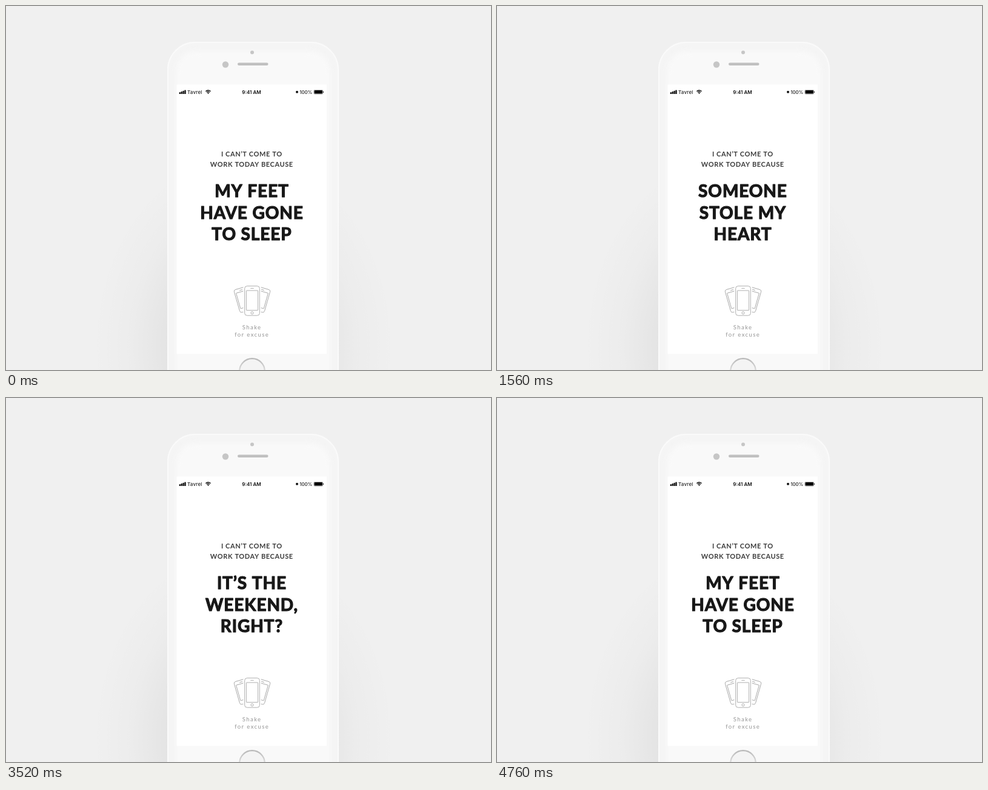
These frames come from a looping animation (800 px wide and 600 px high, 4.92 s). An HTML page with a canvas:

```html
<!DOCTYPE html>
<html lang="en">
<head>
<meta charset="utf-8">
<title>Shake for excuse</title>
<style>
  html, body { margin: 0; width: 100%; height: 100%; overflow: hidden; background: #f0f0f0; }
  canvas { display: block; width: 800px; height: 600px; }
</style>
</head>
<body>
<canvas id="stage" width="800" height="600"></canvas>
<script>
const ctx = document.getElementById('stage').getContext('2d');

const LOOP = 4920, STEP = 40;
const PIVOT = { x: 405, y: 352 };
const SHAKES = [680, 2255, 3862];
const SWING = 4.9, HALF = 280, SETTLE = 310;
const EXCUSES = [
  ['MY FEET', 'HAVE GONE', 'TO SLEEP'],
  ['SOMEONE', 'STOLE MY', 'HEART'],
  ['IT’S THE', 'WEEKEND,', 'RIGHT?']
];
const LATO = 'Lato, "Open Sans", sans-serif';
const INTER = 'Inter, Roboto, sans-serif';

const ease = u => (1 - Math.cos(Math.PI * u)) / 2;

// Right, left, then back to rest
function swing(t) {
  if (t <= 0 || t >= 2 * HALF + SETTLE) return 0;
  if (t < HALF) return SWING * ease(t / HALF);
  if (t < 2 * HALF) return SWING * (1 - 2 * ease(t / HALF - 1));
  return -SWING * (1 - ease((t - 2 * HALF) / SETTLE));
}

function roundRect(x, y, w, h, r) {
  ctx.beginPath();
  ctx.roundRect(x, y, w, h, r);
}

function disc(x, y, r, fill) {
  ctx.beginPath();
  ctx.arc(x, y, r, 0, Math.PI * 2);
  ctx.fillStyle = fill;
  ctx.fill();
}

function text(str, x, y, font, fill, gap = 0, align = 'center') {
  ctx.font = font;
  ctx.letterSpacing = gap + 'px';
  ctx.textAlign = align;
  ctx.fillStyle = fill;
  ctx.fillText(str, align === 'center' ? x + gap / 2 : x, y);
}

function drawShadow() {
  ctx.save();
  ctx.translate(392, 560);
  ctx.scale(250, 320);
  const g = ctx.createRadialGradient(0, 0, 0, 0, 0, 1);
  g.addColorStop(0, 'rgba(0,0,0,.11)');
  g.addColorStop(0.5, 'rgba(0,0,0,.05)');
  g.addColorStop(0.75, 'rgba(0,0,0,.015)');
  g.addColorStop(1, 'rgba(0,0,0,0)');
  disc(0, 0, 1, g);
  ctx.restore();
}

function drawBody() {
  roundRect(266, 59, 283, 620, 46);
  ctx.fillStyle = '#f5f5f5';
  ctx.fill();

  ctx.save();
  ctx.clip();
  ctx.filter = 'blur(5px)';
  roundRect(280, 74, 255, 620, 34);
  ctx.fillStyle = '#f9f9f9';
  ctx.fill();
  ctx.restore();

  roundRect(267, 60, 281, 618, 45);
  ctx.strokeStyle = '#fafafa';
  ctx.lineWidth = 2;
  ctx.stroke();

  disc(406, 76.5, 3, '#c6c6c6');
  disc(362, 96.5, 5.2, '#c6c6c6');
  roundRect(382, 93.5, 50.5, 4.4, 2.2);
  ctx.fillStyle = '#c0c0c0';
  ctx.fill();

  ctx.fillStyle = '#fff';
  ctx.fillRect(281.5, 129.5, 247.5, 444);

  disc(406, 602, 20.8, '#f4f4f4');
  const ring = ctx.createLinearGradient(0, 581, 0, 623);
  ring.addColorStop(0, '#b8b8b8');
  ring.addColorStop(0.5, '#dcdcdc');
  ring.addColorStop(1, '#f0f0f0');
  ctx.strokeStyle = ring;
  ctx.lineWidth = 2.2;
  ctx.stroke();
}

function drawStatus() {
  const ink = '#111';
  ctx.fillStyle = ink;
  for (let i = 0; i < 4; i++) {
    const h = 2.8 + i * 1.2;
    ctx.fillRect(285.7 + i * 2.9, 145 - h, 2.3, h);
  }
  text('Tavrel', 299, 144.7, '500 8px ' + INTER, '#222', 0.2, 'left');

  ctx.strokeStyle = ink;
  ctx.lineWidth = 1.4;
  for (const r of [3.2, 5.6]) {
    ctx.beginPath();
    ctx.arc(333.5, 144.6, r, -Math.PI * 0.76, -Math.PI * 0.24);
    ctx.stroke();
  }
  disc(333.5, 143.8, 1.1, ink);

  text('9:41 AM', 405, 144.7, '600 8px ' + INTER, ink);
  disc(480, 141.8, 2, ink);
  text('100%', 505.2, 144.7, '500 7.8px ' + INTER, '#222', 0, 'right');

  roundRect(507.8, 138.4, 14.8, 6.8, 1.5);
  ctx.strokeStyle = '#777';
  ctx.lineWidth = 0.6;
  ctx.stroke();
  roundRect(508.5, 139.1, 13.4, 5.4, 0.8);
  ctx.fillStyle = '#000';
  ctx.fill();
  ctx.fillRect(523.1, 140.7, 0.9, 2.2);
}

function sidePhone(dir) {
  ctx.save();
  ctx.translate(406 + dir * 13.5, 483.7);
  ctx.rotate(dir * 16 * Math.PI / 180);
  roundRect(-12, -19.5, 24, 39, 3.5);
  ctx.stroke();
  roundRect(-9.6, -13.5, 19.2, 26.5, 0.5);
  ctx.stroke();
  ctx.beginPath();
  ctx.moveTo(-3, -16.3);
  ctx.lineTo(2, -16.3);
  ctx.stroke();
  ctx.restore();
}

function drawIcon() {
  ctx.strokeStyle = '#a6a6a6';
  ctx.lineWidth = 0.9;
  sidePhone(-1);
  sidePhone(1);

  ctx.fillStyle = '#fff';
  roundRect(391.3, 459, 29.4, 54, 5);
  ctx.fill();

  roundRect(393.7, 461.6, 24.6, 48.6, 4);
  ctx.stroke();
  roundRect(396.4, 469, 19.2, 32.6, 0.5);
  ctx.stroke();
  ctx.beginPath();
  ctx.arc(406, 505.9, 2.1, 0, Math.PI * 2);
  ctx.moveTo(403.3, 465.4);
  ctx.lineTo(408.7, 465.4);
  ctx.stroke();
}

function drawCopy(lines) {
  const small = '700 11px ' + LATO;
  text('I CAN’T COME TO', 405, 247.6, small, '#3c3c3c', 0.6);
  text('WORK TODAY BECAUSE', 405, 264.6, small, '#3c3c3c', 0.6);

  // A thin outline thickens the bold weight
  ctx.strokeStyle = '#181818';
  ctx.lineWidth = 1.2;
  ctx.lineJoin = 'round';
  lines.forEach((line, i) => {
    const y = 315.2 + i * 35.6;
    text(line, 405, y, '700 28px ' + LATO, '#181818', 0.9);
    ctx.strokeText(line, 405.45, y);
  });

  text('Shake', 405, 532.8, '9.5px ' + LATO, '#969696', 1.4);
  text('for excuse', 405, 544.8, '9.5px ' + LATO, '#969696', 1.4);
}

function draw(t) {
  const angle = SHAKES.reduce((sum, start) => sum + swing(t - start), 0);
  const shown = SHAKES.filter(start => t >= start + 2 * HALF).length % EXCUSES.length;

  ctx.fillStyle = '#f0f0f0';
  ctx.fillRect(0, 0, 800, 600);
  ctx.save();
  ctx.translate(PIVOT.x, PIVOT.y);
  ctx.rotate(angle * Math.PI / 180);
  ctx.translate(-PIVOT.x, -PIVOT.y);
  drawShadow();
  drawBody();
  drawStatus();
  drawCopy(EXCUSES[shown]);
  drawIcon();
  ctx.restore();
}

const begin = performance.now();
function tick() {
  const t = (performance.now() - begin) % LOOP;
  draw(Math.floor(t / STEP) * STEP);
  requestAnimationFrame(tick);
}
tick();
</script>
</body>
</html>
```
